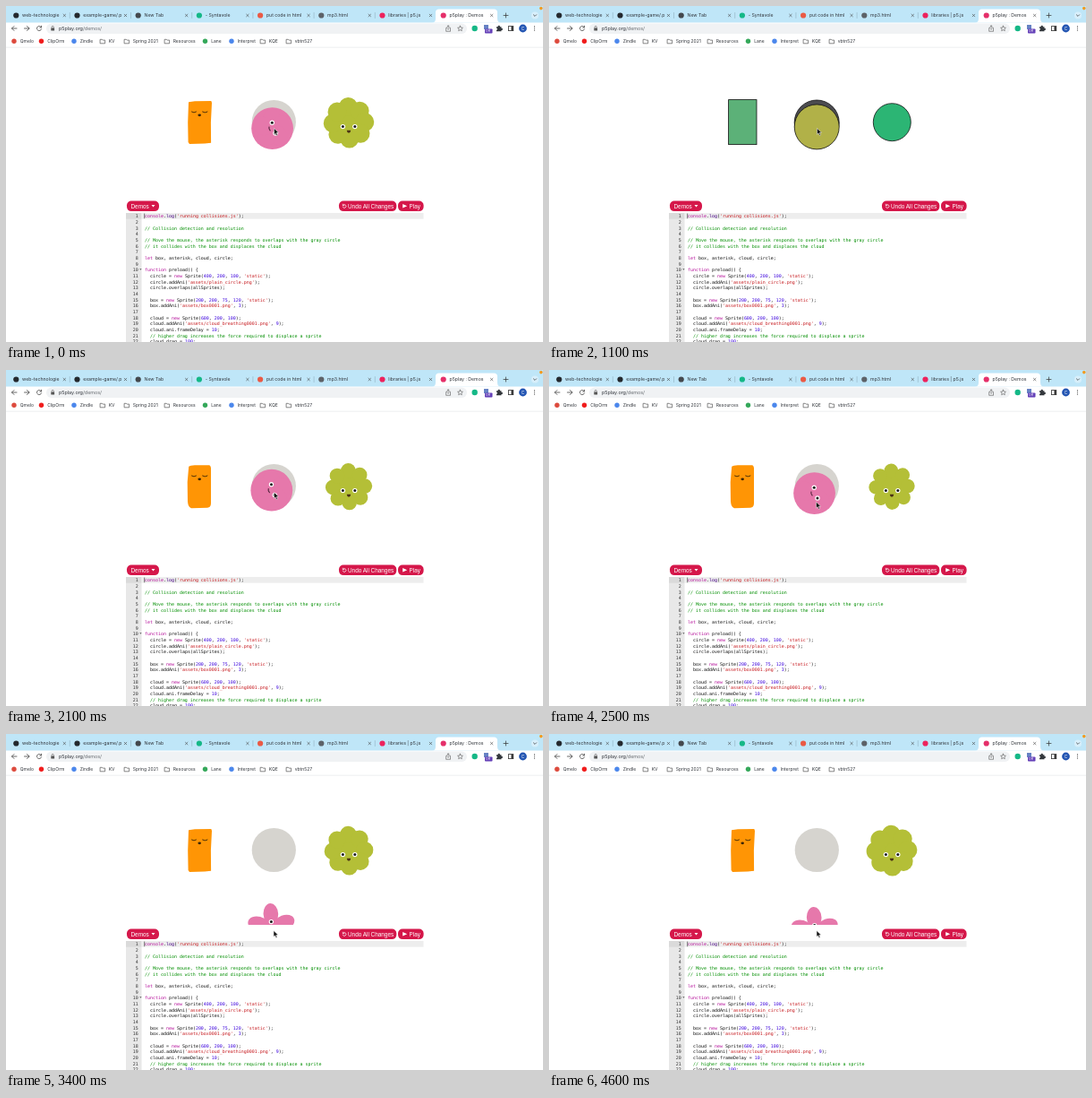
These frames come from a looping animation (600x375 px, 4700 ms). An HTML page:

```html
<!DOCTYPE html>
<html lang="en">
<head>
<meta charset="utf-8">
<title>Collision demo</title>
<style>
html, body { margin: 0; width: 100%; height: 100%; overflow: hidden; background: #fff; }
svg { display: block; width: 600px; height: 375px; }
text { white-space: pre; }
.ui { font: 5.2px Inter, sans-serif; fill: #30343a; }
.btn { font: 6.4px "Liberation Sans", Arial, sans-serif; fill: #fff; }
.code { font: 4.99px "DejaVu Sans Mono", monospace; }
</style>
</head>
<body>
<svg id="stage" viewBox="0 0 600 375">
  <defs><clipPath id="view"><rect y="47" width="600" height="166"/></clipPath></defs>
</svg>
<script>
const stage = document.getElementById('stage');

function el(tag, attrs = {}, parent = stage, text = '') {
  const node = document.createElementNS('http://www.w3.org/2000/svg', tag);
  for (const k in attrs) node.setAttribute(k, attrs[k]);
  if (text) node.textContent = text;
  return parent.appendChild(node);
}
const group = (parent = stage, attrs = {}) => el('g', attrs, parent);
const rect = (x, y, width, height, fill, rx = 0, parent = stage) =>
  el('rect', { x, y, width, height, fill, rx }, parent);
const dot = (cx, cy, r, fill, parent = stage) => el('circle', { cx, cy, r, fill }, parent);
const shape = (d, fill, parent = stage) => el('path', { d, fill }, parent);
const line = (d, stroke, width = 0.8, parent = stage) =>
  el('path', { d, stroke, 'stroke-width': width, fill: 'none', 'stroke-linecap': 'round' }, parent);
const label = (x, y, str, kind = 'ui', more = {}) => el('text', { x, y, class: kind, ...more }, stage, str);

function drawTabs() {
  rect(0, 0, 600, 19, '#bfe6f8');
  shape('M476 18.5Q480 18.5 480 14V7Q480 3.5 484 3.5H545Q549 3.5 549 7V14Q549 18.5 553 18.5Z', '#fff');
  const tabs = [
    ['web-technologie', '#24292e'], ['example-game/.p', '#24292e'], ['New Tab', '#44484d'],
    ['- Syntavole', '#15b887'], ['put code in html', '#ea5a45'], ['mp3.html', '#5d6268'],
    ['libraries | p5.js', '#ed225d'], ['p5play : Demos', '#e5306a']
  ];
  tabs.forEach(([name, color], i) => {
    const x = 11.3 + i * 68.2;
    dot(x, 10.5, 3.1, color);
    label(x + 6.8, 12.3, name);
    const cx = x + 54;
    line(`M${cx - 1.3} 9.2l2.6 2.6m0 -2.6l-2.6 2.6`, '#444', 0.6);
    if (i < 6) line(`M${x + 60} 7.5v6`, '#86a4b3', 0.5);
  });
  line('M556 10.5h5M558.5 8v5', '#333', 0.7);
  dot(591, 10.5, 4, '#d8effb');
  line('M589.4 9.8l1.6 1.6l1.6 -1.6', '#333', 0.7);
  dot(597.8, 2.6, 1.8, '#f39a1f');
}

function drawToolbar() {
  rect(0, 18.5, 600, 28, '#fff');
  rect(45, 19.5, 470, 11.5, '#f0f2f4', 5.7);
  line('M12 25H6.5M9 22.5L6.5 25L9 27.5', '#444');
  line('M20.5 25H26M23.5 22.5L26 25L23.5 27.5', '#444');
  line('M39.4 23.7A2.6 2.6 0 1 0 39.6 25.8M39.6 22.2v1.8h-1.8', '#444');
  rect(50.3, 24.4, 3.8, 3.2, '#555', 0.5);
  line('M51.1 24.5v-1a1.1 1.1 0 0 1 2.2 0v1', '#555', 0.6);
  const url = label(59, 27, '', 'ui', { style: 'font-size:5.4px' });
  el('tspan', {}, url, 'p5play.org');
  el('tspan', { fill: '#666b70' }, url, '/demos/');
  line('M492.5 24.5h-.8v3.8h4.8v-3.8h-.8M494.1 26.5v-4.6M492.7 23.2l1.4 -1.4l1.4 1.4', '#555', 0.6);
  line('M507.5 22.2l.9 1.9l2 .2l-1.5 1.4l.4 2l-1.8 -1l-1.8 1l.4 -2l-1.5 -1.4l2 -.2z', '#555', 0.6);
  dot(523.7, 25, 3.2, '#15b887');
  rect(534, 21, 5, 5, '#6682c4');
  rect(535, 25.5, 8.5, 5, '#6541b8', 0.8);
  label(536, 29.4, 'Off', 'ui', { style: 'font-size:3.5px;fill:#fff' });
  shape('M548 23.2h1.7a1.1 1.1 0 1 1 2.1 0h1.7v1.7a1.1 1.1 0 1 1 0 2.1v1.3h-5.5v-1.5a1 1 0 1 0 0 -2z', '#33373c');
  el('rect', { x: 561.6, y: 22.6, width: 5.2, height: 5, fill: 'none', stroke: '#333', 'stroke-width': 0.8 });
  rect(564.5, 22.6, 2.3, 5, '#333');
  dot(577.5, 25, 4.4, '#2456b3');
  label(577.5, 26.8, 'C', 'ui', { 'text-anchor': 'middle', style: 'fill:#fff;font-size:5px' });
  for (const y of [22.9, 25, 27.1]) dot(590.5, y, 0.6, '#444');
}

function drawBookmarks() {
  const items = [
    [9, 'Qmelo', '#dd4b3e'], [39.5, 'ClipOrm', '#f01d1d'], [76, 'Zindle', '#4b87ec'],
    [108, 'KV'], [135, 'Spring 2021'], [180, 'Resources'],
    [222.5, 'Lane', '#35a85a'], [252, 'Interpret', '#4b87ec'], [287, 'KQE'], [316, 'vbtn527']
  ];
  for (const [x, name, color] of items) {
    if (color) dot(x, 39.3, 2.7, color);
    else line(`M${x - 2.5} 37.3h1.8l.8 .8h2.5v3.7h-5.1z`, '#555', 0.7);
    label(x + 6.7, 41.1, name, 'ui', { style: 'font-size:5px' });
  }
  rect(0, 45.8, 600, 0.6, '#e1e3e5');
}

function drawButtons() {
  const red = '#d5174a';
  rect(135, 217.5, 36, 11.6, red, 5);
  label(139.5, 225.6, 'Demos', 'btn');
  shape('M162.5 222h4l-2 2.5z', '#fff');
  rect(372, 217.5, 64.3, 11.6, red, 5);
  line('M376.5 222.4a1.9 1.9 0 1 1 -.2 1.8M376.3 221.2v1.5h1.5', '#fff', 0.7);
  label(382, 225.6, 'Undo All Changes', 'btn');
  rect(438, 217.5, 28.6, 11.6, red, 5);
  shape('M443.2 221l5 2.3l-5 2.3z', '#fff');
  label(450.6, 225.6, 'Play', 'btn');
}

const SOURCE = `console.log('running collisions.js');

// Collision detection and resolution

// Move the mouse, the asterisk responds to overlaps with the gray circle
// it collides with the box and displaces the cloud

let box, asterisk, cloud, circle;

function preload() {
  circle = new Sprite(400, 200, 100, 'static');
  circle.addAni('assets/plain_circle.png');
  circle.overlaps(allSprites);

  box = new Sprite(200, 200, 75, 120, 'static');
  box.addAni('assets/box0001.png', 3);

  cloud = new Sprite(600, 200, 100);
  cloud.addAni('assets/cloud_breathing0001.png', 9);
  cloud.ani.frameDelay = 10;
  // higher drag increases the force required to displace a sprite
  cloud.drag = 100;`;

function tokenColor(s) {
  if (s.startsWith('//')) return '#008e00';
  if (s[0] === "'") return '#c5171c';
  if (/^\d/.test(s)) return '#3a00dc';
  if (/^(let|new|function|console)$/.test(s)) return '#b5109a';
  if (s === 'log') return '#450084';
  return '#111';
}

function drawEditor() {
  const pitch = 6.67, top = 231;
  rect(134, top, 17.5, 144, '#e8e8e8');
  rect(134, top, 17.5, pitch, '#dadada');
  rect(151.5, top, 315, pitch, '#ededed');
  SOURCE.split('\n').forEach((row, i) => {
    const y = top + 5.2 + i * pitch;
    label(147.8, y, String(i + 1), 'code', { 'text-anchor': 'end', fill: '#333' });
    const text = label(155, y, '', 'code');
    for (const part of row.match(/\/\/.*|'[^']*'|\b\d+\b|\w+|[^\w']+?(?=\/\/|\w|'|$)/g) || [])
      el('tspan', { fill: tokenColor(part) }, text, part);
  });
  shape('M149.2 293.2h2.4l-1.2 1.6z', '#555');
  rect(154.5, top + 0.6, 0.6, 5.6, '#222');
}

drawTabs();
drawToolbar();
drawBookmarks();
drawButtons();
drawEditor();

const view = group(stage, { 'clip-path': 'url(#view)' });
const art = group(view), debug = group(view);
const place = (node, x, y) => node.setAttribute('transform', `matrix(1 0 0 1 ${x} ${y})`);

dot(299.3, 129.5, 24.6, '#d6d4cf', art);

// Box: the outline alternates, the face stays
const BOX = [
  'M204 107.2L211 106.2L229.3 106L230 108L228.9 130L229.1 152.8L222 153.6L205 154L203.6 152L203.2 130Z',
  'M204.2 107.8Q206 106 212 106.2L227 106.2Q229.4 106.6 229 112L229 149Q228.8 153.5 225 153.7L207 154.3Q203.5 153 203 147L202.7 125Z'
];
const boxBody = shape(BOX[0], '#ff9505', art);
line('M207.5 118.1q2.5 1.8 5 0M219.6 118.1q2.7 1.8 5.4 0', '#3a2508', 0.9, art);
el('ellipse', { cx: 216.2, cy: 121.8, rx: 1.8, ry: 1.4, fill: '#3a2508' }, art);

function petals(parent, count, color, turn) {
  const core = dot(0, 0, 10, color, parent);
  const lobes = Array.from({ length: count }, (_, i) =>
    el('ellipse', { fill: color, transform: `rotate(${turn + i * 360 / count})` }, parent));
  return (coreR, dist, rx, ry) => {
    core.setAttribute('r', coreR);
    for (const lobe of lobes) {
      lobe.setAttribute('cx', dist);
      lobe.setAttribute('rx', rx);
      lobe.setAttribute('ry', ry);
    }
  };
}
function eye(x, y, parent) {
  dot(x, y, 2.7, '#fff', parent);
  dot(x, y, 1.5, '#1c1c1c', parent);
}

const cloud = group(art);
place(cloud, 383, 130.2);
const shapeCloud = petals(cloud, 8, '#b4bf37', -92);
eye(-6.6, 4.4, cloud);
eye(6.8, 4.4, cloud);
shape('M-2.3 8.6h4.6q-.4 2.9 -2.3 2.9t-2.3 -2.9z', '#4a3216', cloud);

const star = group(art);
const shapeStar = petals(star, 5, '#e678ab', -93);
eye(-0.3, -6.4, star);
eye(3.4, 5.4, star);
line('M-3.6 -1.6q-.6 2.4 1.2 4', '#4a2036', 1.1, star);

// Colliders
const edge = { stroke: '#111', 'stroke-width': 0.8 };
el('circle', { cx: 299.2, cy: 130, r: 25, fill: '#4c4c50', ...edge }, debug);
el('rect', { x: 200.6, y: 104.6, width: 31.4, height: 50, fill: '#5cb178', ...edge }, debug);
el('circle', { cx: 383.3, cy: 129.7, r: 21, fill: '#2cb574', ...edge }, debug);
const starCollider = el('circle', { r: 25, fill: '#b1b148', ...edge }, debug);

const pointer = el('path', {
  d: 'M0 0V6.8L1.6 5.4L2.8 8L4 7.5L2.8 5L5 4.8Z', fill: '#111', stroke: '#fff', 'stroke-width': 0.5
});

const LOOP = 4700, STEP = 100;
const DEBUG_ON = 350, DEBUG_OFF = 1750;
const STAR_PATH = [
  [0, 297.6, 136.6], [600, 297.6, 136.2], [1600, 297.6, 135.2], [2100, 296.8, 134.2], [2400, 296.8, 134.2],
  [2600, 296.3, 141], [2750, 295, 154], [2900, 293.6, 174], [3100, 295, 200], [3300, 296.5, 214], [3600, 297, 220]
];
const POINTER_PATH = [[0, 299.5, 136.5], [2400, 299.5, 136.5], [2600, 297.5, 158], [2900, 294.5, 198], [3200, 299, 219.5]];

function at(path, t) {
  const next = path.findIndex(p => p[0] > t);
  if (next < 0) return path[path.length - 1].slice(1);
  const a = path[next - 1], b = path[next], u = (t - a[0]) / (b[0] - a[0]);
  return [a[1] + (b[1] - a[1]) * u, a[2] + (b[2] - a[2]) * u];
}
const mix = (a, b, u) => a + (b - a) * u;

function render(now) {
  const t = Math.floor((now % LOOP) / STEP) * STEP;
  const showDebug = t > DEBUG_ON && t < DEBUG_OFF;
  art.style.display = showDebug ? 'none' : '';
  debug.style.display = showDebug ? '' : 'none';

  boxBody.setAttribute('d', BOX[(t / STEP) % 2]);

  const swell = 0.5 + 0.5 * Math.cos((t - 100) / 1500 * 2 * Math.PI);
  const lobe = mix(7.6, 10.6, swell);
  shapeCloud(mix(17.5, 22, swell), 17.8, lobe, lobe);

  const [x, y] = at(STAR_PATH, t);
  const bloom = Math.min(1, Math.max(0, (t - 2950) / 250));
  place(star, x, y);
  shapeStar(mix(23.4, 12, bloom), mix(10, 15.2, bloom), mix(12, 11.8, bloom), mix(10, 8.3, bloom));
  place(starCollider, x + 1.6, y - 0.8);

  place(pointer, ...at(POINTER_PATH, t));
}

function tick() {
  render(performance.now());
  requestAnimationFrame(tick);
}
tick();
</script>
</body>
</html>
```
